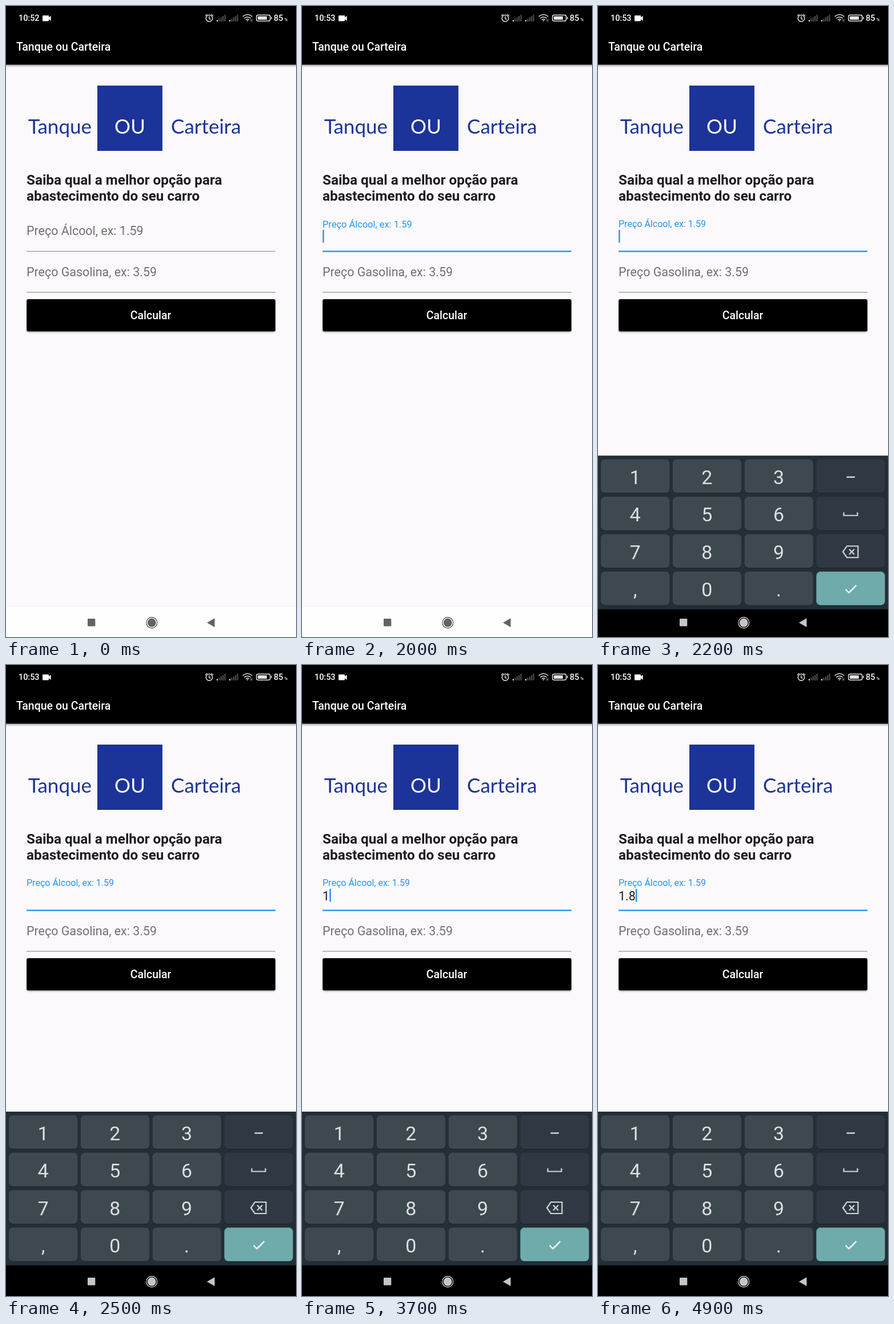
Write an HTML page that moves like this. It is 508 px wide and 1102 px high and loops after 5 s.

```html
<!DOCTYPE html>
<html lang="pt">
<head>
<meta charset="utf-8">
<title>Tanque ou Carteira</title>
<style>
  html, body { margin: 0; width: 100%; height: 100%; overflow: hidden; background: #fbf9fc; }
  svg { display: block; width: 100%; height: 100%; }
  text { font-family: Roboto, sans-serif; white-space: pre; }
  .mark { font-family: Lato, sans-serif; font-size: 35px; fill: #1c3399; }
  .medium { font-weight: 500; fill: #fff; }
  .heading { font-weight: 700; font-size: 24.25px; fill: #1d1b20; }
  .label { font-size: 21.45px; fill: #716f73; }
  .key { font-size: 34px; fill: #dce0e3; text-anchor: middle; }
</style>
</head>
<body>
<svg viewBox="0 0 508 1102">
  <defs>
    <linearGradient id="barShadow" x2="0" y2="1">
      <stop stop-color="#000" stop-opacity=".34"/>
      <stop offset="1" stop-color="#000" stop-opacity="0"/>
    </linearGradient>
    <filter id="soft" x="-5%" y="-20%" width="110%" height="140%">
      <feGaussianBlur stdDeviation="1.4"/>
    </filter>
  </defs>
  <rect width="508" height="1102" fill="#fbf9fc"/>

  <rect y="102" width="508" height="5.5" fill="url(#barShadow)"/>
  <rect width="508" height="102.5"/>
  <text id="clock" class="medium" x="22" y="26.4" font-size="14.4">10:52</text>
  <path d="M65 16.5h9q1 0 1 1v2.5l3.6-3v9l-3.6-3v2.6q0 1-1 1h-9q-1 0-1-1v-8.1q0-1 1-1z" fill="#fff"/>
  <g id="status" fill="none" stroke="#e4e4e4" stroke-width="1.5">
    <circle cx="356" cy="21.5" r="5.7"/>
    <path d="M356 18v4l2.6 1.4M349 17.5l3.5-3M363 17.5l-3.5-3"/>
    <path d="M414.5 18.5q8.5-7 17 0M417.2 21.5q5.8-4.6 11.6 0M420 24.2q3-2.2 6 0"/>
    <path d="M421.3 25h3.4l-1.7 2.3z" fill="#e4e4e4" stroke="none"/>
    <path d="M429 23v4.2M431 23v4.2" stroke-width="1" stroke="#aaa"/>
    <rect x="438.7" y="15.7" width="24" height="10.6" rx="3"/>
    <rect x="441" y="18" width="16" height="6" rx="1" fill="#e4e4e4" stroke="none"/>
    <path d="M465 19v4"/>
  </g>
  <text class="medium" x="469" y="26.4" font-size="14.4">85</text>
  <text class="medium" x="487.5" y="26.4" font-size="8">%</text>
  <text class="medium" x="18" y="78.3" font-size="19.5">Tanque ou Carteira</text>

  <rect x="160" y="139" width="114" height="114" fill="#1c3399"/>
  <text class="mark" x="150" y="223" text-anchor="end">Tanque</text>
  <text class="mark" x="217" y="223" text-anchor="middle" style="fill:#fff">OU</text>
  <text class="mark" x="289" y="223">Carteira</text>

  <text class="heading" x="36" y="311.6">Saiba qual a melhor opção para</text>
  <text class="heading" x="36" y="340">abastecimento do seu carro</text>

  <text id="label" class="label" x="36">Preço Álcool, ex: 1.59</text>
  <rect id="line" x="36" width="436"/>
  <text id="entry" x="36" y="410.5" font-size="21.45" fill="#1d1b20"></text>
  <rect id="cursor" y="391" width="2.4" height="22.5"/>
  <text class="label" x="36" y="472.4">Preço Gasolina, ex: 3.59</text>
  <rect x="36" y="499.4" width="436" height="1.2" fill="#929094"/>

  <rect x="36.2" y="514" width="435.6" height="55.5" rx="3" opacity=".4" filter="url(#soft)"/>
  <rect x="36.2" y="512" width="435.6" height="56.2" rx="2.6"/>
  <text class="medium" x="253.6" y="547" font-size="19.5" text-anchor="middle">Calcular</text>

  <rect y="1048" width="508" height="54" fill="#fefefe"/>
  <rect y="1048" width="508" height="1" fill="#efeef1"/>
  <g id="keyboard"></g>
  <g id="nav" stroke-width="0">
    <rect x="143" y="1070" width="13.3" height="13.3" rx="1"/>
    <circle cx="255.3" cy="1077" r="7.4"/>
    <circle cx="255.3" cy="1077" r="9.5" fill="none" stroke-width="1.3"/>
    <path d="M352 1077l13.5-7.8v15.6z"/>
  </g>
</svg>
<script>
const LOOP = 5000, STEP = 100, FOCUS = 1900, RISE = 2000, DROP = 322;
const KEY_TIMES = [3600, 3900, 4600], VALUE = '1.8';
const $ = id => document.getElementById(id);
const set = (el, attrs) => { for (const k in attrs) el.setAttribute(k, attrs[k]); };

function add(parent, tag, attrs, text = '') {
  const el = document.createElementNS('http://www.w3.org/2000/svg', tag);
  set(el, attrs);
  el.textContent = text;
  return parent.appendChild(el);
}

function buildSignal(x) {
  for (let i = 0; i < 5; i++) {
    const h = 2.5 + i * 2.3;
    add($('status'), 'rect', {
      x: x + i * 3.4, y: 27 - h, width: 2, height: h,
      fill: i ? '#555' : '#eee', stroke: 'none'
    });
  }
}

function buildKeyboard() {
  const board = $('keyboard');
  add(board, 'rect', { y: 780, width: 508, height: 269, fill: '#232e37' });
  add(board, 'rect', { y: 1048.5, width: 508, height: 400 });
  ['123-', '456_', '789<', ',0.>'].forEach((row, r) => {
    [...row].forEach((char, c) => {
      const x = 5 + c * 125.8, y = 786.4 + r * 65.4;
      const fill = c < 3 ? '#3e484f' : char === '>' ? '#6eabaa' : '#303943';
      const box = { x, width: 120.3, height: 58.6, rx: 7 };
      add(board, 'rect', { ...box, y: y + 1.2, fill: '#1b242b' });
      add(board, 'rect', { ...box, y, fill });
      if (c < 3) add(board, 'text', { class: 'key', x: x + 60, y: y + 43.4 }, char);
    });
  });
  const icon = (d, width, stroke = '#d0d5d9') =>
    add(board, 'path', { d, fill: 'none', stroke, 'stroke-width': width });
  icon('M435.5 817.5h14.5', 2.5);
  icon('M430.5 879v5.5h24v-5.5', 2.2);
  icon('M436 938h19.5v20H436l-7-10zM440 943.5l9 9M449 943.5l-9 9', 2.2);
  icon('M433.5 1013.5l6 6 13-13', 2.3, '#fff');
}

const clamp = v => Math.min(1, Math.max(0, v));
const lerp = (a, b, p) => a + (b - a) * p;

// The caret blinks once a second and restarts at each key press.
function caretOn(t) {
  const start = [RISE, ...KEY_TIMES].filter(s => s <= t).pop();
  return start !== undefined && (t - start) % 1000 < 500;
}

function draw(time) {
  const t = Math.floor(time % LOOP / STEP) * STEP;
  const focused = t >= RISE;
  const float = 1 - (1 - clamp((t - FOCUS) / 170)) ** 3;
  const offset = DROP * (1 - clamp((t - RISE) / 240)) ** 2.3;
  const text = VALUE.slice(0, KEY_TIMES.filter(s => s <= t).length);

  $('clock').textContent = focused ? '10:53' : '10:52';
  set($('label'), { y: lerp(400.4, 386, float) });
  $('label').style.fontSize = lerp(21.45, 16.05, float) + 'px';
  $('label').style.fill = focused ? '#2196f3' : '';
  set($('line'), focused
    ? { y: 427.3, height: 2.4, fill: '#2196f3' }
    : { y: 427.9, height: 1.2, fill: '#929094' });

  $('entry').textContent = text;
  set($('cursor'), {
    x: 36.2 + (text ? $('entry').getComputedTextLength() : 0),
    visibility: caretOn(t) ? 'visible' : 'hidden',
    fill: text ? '#2c8be6' : '#5a80c8'
  });

  set($('keyboard'), { transform: `translate(0 ${offset})` });
  const tint = offset < DROP ? '#c6c6c6' : '#636363';
  set($('nav'), { fill: tint, stroke: tint });
}

buildSignal(369);
buildSignal(391);
buildKeyboard();

const begin = performance.now();
function tick() {
  draw(performance.now() - begin);
  requestAnimationFrame(tick);
}
tick();
</script>
</body>
</html>
```
